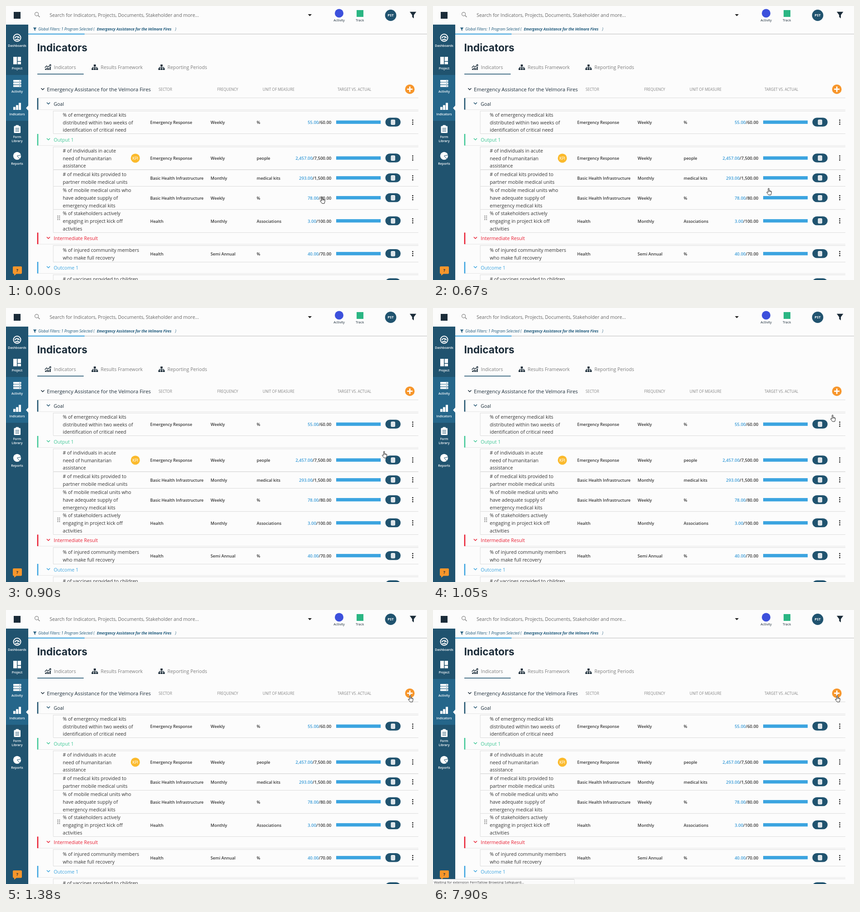
Write an HTML page that moves like this. It is 927 by 604 pixels and loops after 8 s.

```html
<!DOCTYPE html>
<html lang="en">
<head>
<meta charset="utf-8">
<title>Indicators</title>
<style>
html, body { margin: 0; width: 100%; height: 100%; overflow: hidden; background: #fcfcfc; }
svg { display: block; font-family: "Open Sans", "Noto Sans", sans-serif; }
</style>
</head>
<body>
<svg id="stage" width="927" height="604" viewBox="0 0 927 604"></svg>
<script>
const LOOP = 8000;
const NAVY = '#20536f', INK = '#1b2c39', BLUE = '#3ba4e0', ORANGE = '#f7962b', RULE = '#dcdcdc';
const PROGRAM = 'Emergency Assistance for the Velmora Fires';
const stage = document.getElementById('stage');

function add(tag, attrs, parent = stage) {
  const el = document.createElementNS('http://www.w3.org/2000/svg', tag);
  for (const k in attrs) el.setAttribute(k, attrs[k]);
  parent.appendChild(el);
  return el;
}
const rect = (x, y, width, height, fill, rx = 0, parent) => add('rect', { x, y, width, height, fill, rx }, parent);
const circle = (cx, cy, r, fill, parent) => add('circle', { cx, cy, r, fill }, parent);
const fillPath = (d, fill, parent) => add('path', { d, fill }, parent);
const line = (d, stroke, width = 1, parent) =>
  add('path', { d, stroke, 'stroke-width': width, fill: 'none' }, parent);

// cy is the visual middle of the line of text
function text(str, x, cy, size, fill, opts = {}, parent) {
  const el = add('text', { x, y: cy + size * 0.36, 'font-size': size, fill, ...opts }, parent);
  el.textContent = str;
  return el;
}
const MID = { 'text-anchor': 'middle' };
const SEMI = { 'font-weight': 600 };
const chevron = (x, y, color) => line(`M${x - 3.5} ${y - 2}l3.5 3.5 3.5-3.5`, color, 1.5);
const funnel = (x, y, s, color) =>
  fillPath(`M${x - s} ${y - s}h${2 * s}l${-0.75 * s} ${s}v${s}l${-0.5 * s} ${-0.4 * s}v${-0.6 * s}z`, color);

function topBar() {
  rect(0, 0, 927, 604, '#fcfcfc');
  rect(17, 13, 15, 15, INK);
  add('circle', { cx: 67.5, cy: 17.8, r: 4, fill: 'none', stroke: '#888', 'stroke-width': 1.2 });
  line('M70.5 20.8l3.8 3.6', '#888', 1.5);
  text('Search for Indicators, Projects, Documents, Stakeholder and more...', 96, 20.5, 10.48, '#666');
  fillPath('M664.8 18h8.4l-4.2 4.5z', '#222');
  circle(733.5, 16, 9.5, '#3c50dc');
  rect(772, 9, 15, 15, '#2bb683');
  text('Activity', 733.5, 31.5, 7.4, INK, MID);
  text('Track', 779, 31.5, 7.4, INK, MID);
  circle(847, 20.5, 12.4, NAVY);
  text('PST', 847, 20.7, 7.6, '#fff', { ...MID, 'font-weight': 700 });
  funnel(896.2, 20, 7.2, INK);

  funnel(63.5, 51.2, 3.8, '#1f5a7c');
  const it = { 'font-style': 'italic' };
  text('Global Filters: 1 Program Selected (', 71, 51.3, 8.1, '#1f5a7c', it);
  text(PROGRAM, 200, 51.3, 8, '#1f5a7c', { ...it, 'font-weight': 700 });
  text(')', 372.5, 51.3, 8.1, '#1f5a7c', it);
  rect(49, 60.8, 878, 2, '#dadada');
  rect(49, 60.8, 124, 2, BLUE);
}

function sideBar() {
  const W = '#fff';
  rect(0, 41, 49, 563, NAVY);
  rect(0, 152, 49, 101, '#25668a');
  fillPath('M49 219.5v11l-5-5.5z', '#fcfcfc');

  circle(24.5, 70, 9, W);
  circle(24.5, 70, 7, NAVY);
  line('M19.8 71a4.8 4.8 0 0 1 9.4 0', W, 2);
  line('M24.5 72l3-5', W, 1.4);
  rect(20, 73, 9, 2.2, W, 1);

  rect(16, 112, 8, 16.5, W);
  rect(25.5, 112, 7.5, 9.5, W);
  rect(25.5, 123, 7.5, 5.5, W);

  for (let i = 0; i < 3; i++) {
    rect(16, 163 + i * 5.6, 17.5, 4.4, W, 0.8);
    rect(29, 164.7 + i * 5.6, 2.5, 1, '#25668a');
  }
  [[16, 6.5], [22, 10.5], [28, 15.5]].forEach(([x, h]) => rect(x, 229 - h, 5, h, W));

  rect(17.5, 264.5, 14.5, 15.5, W, 1.5);
  rect(21.5, 262.5, 6.5, 3.5, W, 1);
  for (let i = 0; i < 3; i++) rect(20.5, 269 + i * 3.2, 8.5, 1.1, NAVY);

  circle(24.5, 330.3, 8.6, W);
  line('M33.4 328.5l-8.9 1.8 6 7', NAVY, 1);

  [['Dashboards', 87], ['Project', 137.3], ['Activity', 188], ['Indicators', 238.3],
   ['Form', 288.5], ['Library', 297], ['Reports', 347.5]]
    .forEach(([s, y]) => text(s, 24.5, y, 7, W, { ...MID, ...SEMI }));

  fillPath('M17 574h16q2 0 2 2v12.5q0 2-2 2h-10l-5 4v-4h-1q-2 0-2-2v-12.5q0-2 2-2z', ORANGE);
  text('?', 25, 582.4, 9, INK, { ...MID, 'font-weight': 700 });
}

function treeIcon(x, y) {
  rect(x - 2.3, y - 6, 4.6, 4, INK);
  line(`M${x} ${y - 2}v5M${x - 5} ${y + 3}v-2.6h10v2.6`, INK, 1.2);
  [-5, 0, 5].forEach(dx => rect(x + dx - 2, y + 2.2, 4, 3.8, INK));
}

function heading() {
  text('Indicators', 68.5, 92, 22.5, INK, { 'font-family': 'Inter, sans-serif', 'font-weight': 700 });
  [3, 5, 4, 7.5].forEach((h, i) => rect(86 + i * 3.4, 141 - h, 2.3, h, INK));
  line('M85.5 136l4-4 3 2.5 5.5-5', INK, 1.5);
  fillPath('M95 128.7h4.3v4.3z', INK);
  treeIcon(195.5, 135);
  treeIcon(342.5, 135);
  [['Indicators', 105.5], ['Results Framework', 208.5], ['Reporting Periods', 355.5]]
    .forEach(([s, x]) => text(s, x, 135.3, 10.45, '#7d7d7d'));
  rect(69, 149.3, 102, 1.6, NAVY);

  chevron(80.8, 183.2, INK);
  text(PROGRAM, 90, 184, 11.3, INK, { 'font-weight': 500 });
  [['SECTOR', 336], ['FREQUENCY', 465], ['UNIT OF MEASURE', 565], ['TARGET VS. ACTUAL', 730]]
    .forEach(([s, x]) => text(s, x, 183.7, 8.1, '#858585'));
  circle(889.2, 183.4, 10.5, ORANGE);
  line('M883.2 183.4h12M889.2 177.4v12', '#fff', 2.8);
  rect(69, 202, 839, 1, RULE);
}

function group(name, y, color, ink = color) {
  rect(69, y + 25, 839, 1, '#e6e6e6');
  rect(68.6, y, 2.6, 25.5, color);
  chevron(93.3, y + 11.8, color);
  text(name, 105, y + 13, 10.6, ink, { 'font-weight': 500 });
}

function row(top, bottom, lines, sector, freq, unit, actual, target) {
  const cy = (top + bottom) / 2 + 0.4;
  rect(104, top, 804, 1, RULE);
  rect(104, bottom, 804, 1, RULE);
  rect(103.6, top, 1, bottom - top, RULE);
  lines.forEach((s, i) => text(s, 125, cy + 0.3 + (i - (lines.length - 1) / 2) * 16.8, 10.6, '#333'));
  [[sector, 317.6], [freq, 450.6], [unit, 552]]
    .forEach(([s, x]) => text(s, x, cy + 0.5, 9.05, '#333', SEMI));
  const nums = text('', 716.5, cy + 0.5, 9.5, '#333', { ...SEMI, 'text-anchor': 'end' });
  add('tspan', { fill: '#3a9cd8' }, nums).textContent = actual;
  add('tspan', {}, nums).textContent = '/' + target;

  rect(727, cy - 4, 98, 7.4, BLUE);
  rect(835.3, cy - 10.2, 33.6, 19.6, NAVY, 9.8);
  rect(847.5, cy - 6, 9.4, 11.6, '#fff', 2);
  for (let i = 0; i < 3; i++) rect(848.5, cy - 3.4 + i * 3, 7.4, 0.8, '#7e9caf');
  [-4.4, 0, 4.4].forEach(d => circle(895.6, cy - 0.3 + d, 1.4, '#222'));
}

function table() {
  const basic = 'Basic Health Infrastructure';
  group('Goal', 203, NAVY, INK);
  row(231, 281, ['% of emergency medical kits', 'distributed within two weeks of', 'identification of critical need'],
    'Emergency Response', 'Weekly', '%', '55.00', '60.00');
  group('Output 1', 282, '#3fc896');
  row(310, 360, ['# of individuals in acute', 'need of humanitarian', 'assistance'],
    'Emergency Response', 'Weekly', 'people', '2,457.00', '7,500.00');
  row(360.5, 397, ['# of medical kits provided to', 'partner mobile medical units'],
    basic, 'Monthly', 'medical kits', '293.00', '1,500.00');
  row(397, 448, ['% of mobile medical units who', 'have adequate supply of', 'emergency medical kits'],
    basic, 'Weekly', '%', '78.00', '80.00');
  row(448, 499, ['% of stakeholders actively', 'engaging in project kick off', 'activities'],
    'Health', 'Monthly', 'Associations', '3.00', '100.00');
  group('Intermediate Result', 499.5, '#e91e32');
  row(527.5, 564, ['% of injured community members', 'who make full recovery'],
    'Health', 'Semi Annual', '%', '40.00', '70.00');
  group('Outcome 1', 564, BLUE);
  row(592, 628, ['# of vaccines provided to children', 'under five years'],
    'Health', 'Monthly', 'vaccines', '120.00', '500.00');

  circle(284.8, 335.4, 10, '#fbba2c');
  text('KPI', 284.8, 335.6, 8.2, '#fff', { ...MID, 'font-family': 'Roboto, sans-serif' });
  for (let i = 0; i < 6; i++) rect(113 + (i % 2) * 3.8, 462 + (i >> 1) * 3.8, 2.1, 2.1, '#888');
}

topBar();
sideBar();
heading();
table();

const status = add('g', {});
rect(-1, 593, 312.5, 12, '#cfcfcf', 2, status);
rect(0, 594, 311, 11, '#fbfbfb', 1, status);
text('Waiting for extension FernTallow Browsing Safeguard...', 2, 600.3, 7.8, '#444', {}, status);

const hand = add('g', {});
add('path', {
  d: 'M4 9.6V1.8a1.1 1.1 0 0 1 2.2 0V6l3.8.8q1.5.4 1.4 2l-.5 3.1-.9 3.4H5L1 10.2q-.5-1.5 1-1.4z',
  fill: '#fff', stroke: '#222', 'stroke-width': 1, 'stroke-linejoin': 'round'
}, hand);
line('M6.2 6v2.6M8 6.6v2.2M9.8 7v2', '#222', 0.7, hand);

const arrow = add('path', {
  d: 'M893 187.8v10.4l2.4-2.2 1.7 3.8 1.6-.7-1.7-3.7h3.2z',
  fill: '#fff', stroke: '#222', 'stroke-width': 0.9, 'stroke-linejoin': 'round'
});

// time, left, top of the hand
const PATH = [
  [590, 698, 418], [690, 743, 397], [790, 789, 364], [890, 837, 303],
  [990, 871, 247], [1110, 882, 211], [1230, 885.3, 192], [1270, 885, 191]
];

function handAt(t) {
  if (t < 470) return [691, 420];
  if (t < 590) return [692, 421];
  if (t >= 1380) return [885, 187.5];
  if (t >= 1350) return [885, 188.5];
  if (t >= 1320) return [885, 190];
  const s = Math.min(1270, 590 + Math.floor((t - 590) / 40) * 40);
  let i = 1;
  while (PATH[i][0] < s) i++;
  const [t0, x0, y0] = PATH[i - 1], [t1, x1, y1] = PATH[i];
  const k = (s - t0) / (t1 - t0);
  return [x0 + (x1 - x0) * k, y0 + (y1 - y0) * k];
}

const show = (el, on) => el.setAttribute('visibility', on ? 'visible' : 'hidden');

function draw(t) {
  const [x, y] = handAt(t);
  hand.setAttribute('transform', `translate(${x} ${y})`);
  show(hand, t < 7690 || t >= 7900);
  show(arrow, t >= 7690 && t < 7740);
  show(status, t >= 7740);
}

const start = performance.now();
function tick() {
  draw((performance.now() - start) % LOOP);
  requestAnimationFrame(tick);
}
tick();
</script>
</body>
</html>
```
